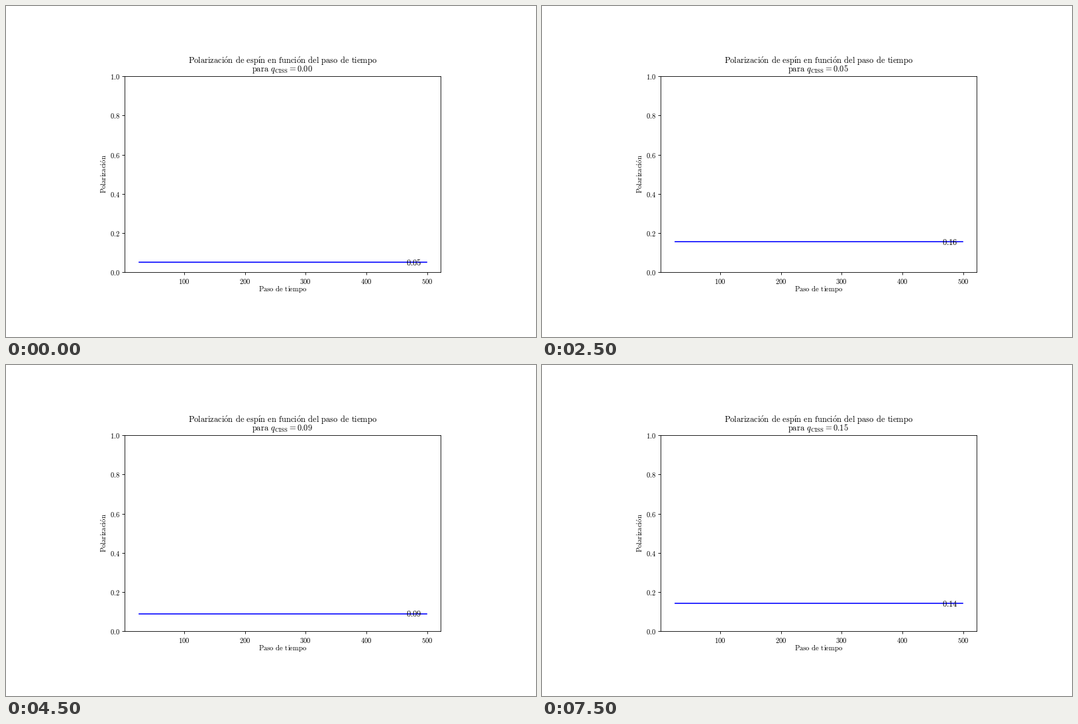
These frames come from a looping animation (800x500 px, 8 s). A matplotlib script:

```python
import matplotlib.pyplot as plt
from matplotlib.animation import FuncAnimation

W, H, DPI = 800, 500, 80
PT = 72 / DPI  # points per pixel
SMALL, LARGE = 10.67 * PT, 12.53 * PT
LEFT, RIGHT, TOP, BOTTOM = 179.4, 656.3, 106.2, 402.4
FIRST, LAST = 26, 499  # time steps covered by the line

# polarization for q = 0.00, 0.01, ...
POLARIZATION = [0.0515, 0.0115, 0.08, -0.033, -0.5, 0.156, 0.102, 0.034,
                -0.130, 0.09, -0.120, -0.0265, 0.07, -0.0575, -0.036, 0.142]

plt.rcParams["mathtext.fontset"] = "cm"


def roman(text):
    """Upright Computer Modern text as mathtext."""
    for char, tex in ((" ", r"\hspace{0.38}"), ("ó", r"\acute{o}"),
                      ("í", r"\acute{ı}")):
        text = text.replace(char, tex)
    return rf"\mathrm{{{text}}}"


fig = plt.figure(figsize=(W / DPI, H / DPI), dpi=DPI, facecolor="white")
ax = fig.add_axes([LEFT / W, 1 - BOTTOM / H,
                   (RIGHT - LEFT) / W, (BOTTOM - TOP) / H])


def label(x, y, text="", size=LARGE, **kwargs):
    """Text on a baseline, in pixels from the top left corner."""
    kwargs = {"ha": "center", "va": "baseline", **kwargs}
    return fig.text(x / W, 1 - y / H, text, fontsize=size, **kwargs)


margin = 0.05 * (LAST - FIRST)
ax.set_xlim(FIRST - margin, LAST + margin)
ax.set_ylim(0, 1)
xticks = range(100, 501, 100)
yticks = [i / 5 for i in range(6)]
ax.set_xticks(xticks, [f"${x}$" for x in xticks])
ax.set_yticks(yticks, [f"${y:.1f}$" for y in yticks])
ax.tick_params(labelsize=SMALL, length=3.75 * PT, pad=3.5 * PT,
               width=0.857 * PT)
for spine in ax.spines.values():
    spine.set_linewidth(0.857 * PT)

title = "Polarización de espín en función del paso de tiempo"
label(418, 86.5, f"${roman(title)}$")
label(417.5, 431, f"${roman('Paso de tiempo')}$", SMALL)
label(152.3, 253.5, f"${roman('Polarización')}$", SMALL,
      rotation=90, rotation_mode="anchor")

subtitle = label(417, 99, color="black")
value = label(627.8, 0, ha="right")
hyphen = label(604, 0, ha="right", family="Liberation Serif")
line, = ax.plot([], [], color="blue", lw=1.6 * PT)


def update(i):
    p = POLARIZATION[i]
    q = rf"q_{{\mathrm{{CISS}}}} = {i / 100:.2f}"
    subtitle.set_text(f"${roman('para ')}{q}$")
    line.set_data([FIRST, LAST], [p, p])
    baseline = BOTTOM - p * (BOTTOM - TOP) + 4.4
    for text in (value, hyphen):
        text.set_y(1 - baseline / H)
    value.set_text(f"${abs(p):.2f}$")
    hyphen.set_text("-" if p < 0 else "")
    return subtitle, line, value, hyphen


anim = FuncAnimation(fig, update, frames=len(POLARIZATION), interval=500,
                     repeat=True, repeat_delay=0)
plt.show()
```
